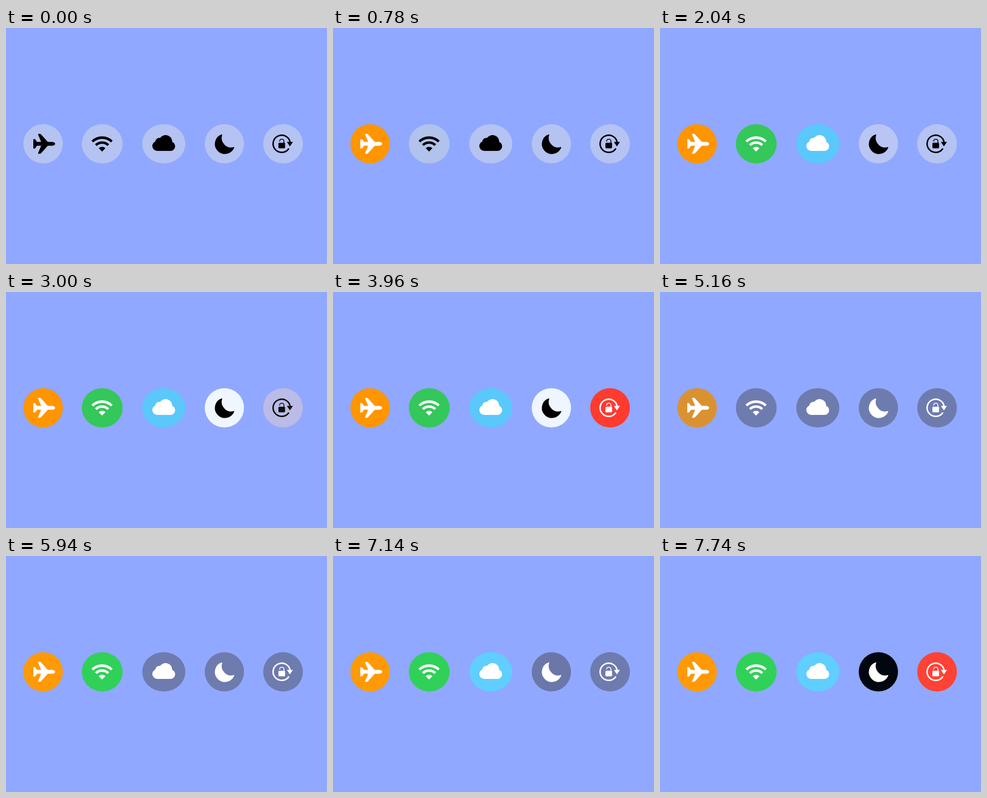
An HTML page for the animation above (8000 ms loop, 588 px wide and 432 px high).

```html
<!DOCTYPE html>
<html lang="en">
<head>
<meta charset="utf-8">
<title>Control toggles</title>
<style>
  html, body { margin: 0; width: 100%; height: 100%; overflow: hidden; background: #90a8ff; }
  svg { display: block; width: 588px; height: 432px; }
  .icon { fill: currentColor; stroke: none; }
  .line { fill: none; stroke: currentColor; }
</style>
</head>
<body>
<svg viewBox="0 0 588 432">
  <g class="tile">
    <ellipse cx="68" cy="212" rx="36.2" ry="36"/>
    <path class="icon" d="M90 212C90 209.6 87 208.4 84 208.4H76.6L64.4 195.1Q63.2 193.8 61.8 193.8H59.6Q58.4 193.8 58.8 195L64.4 208.4H56.8L53.6 204Q53 203.2 52 203.2H50.8Q50 203.2 50 204V220Q50 220.8 50.8 220.8H52Q53 220.8 53.6 220L56.8 215.6H64.4L58.8 229Q58.4 230.2 59.6 230.2H61.8Q63.2 230.2 64.4 228.9L76.6 215.6H84C87 215.6 90 214.4 90 212Z"/>
  </g>
  <g class="tile">
    <ellipse cx="176.3" cy="212" rx="37.4" ry="36"/>
    <g class="line" stroke-width="4.6">
      <path d="M158.2 207.9A25.3 25.3 0 0 1 193.8 207.9"/>
      <path d="M164.6 214.4A16.2 16.2 0 0 1 187.4 214.4"/>
    </g>
    <path class="icon" d="M176 226.2L169.9 220.1A8.7 8.7 0 0 1 182.1 220.1Z"/>
  </g>
  <g class="tile">
    <ellipse cx="289" cy="212" rx="39.5" ry="36"/>
    <g class="icon">
      <circle cx="292.3" cy="208" r="12"/>
      <circle cx="281.2" cy="208.8" r="7.8"/>
      <circle cx="277" cy="216" r="9"/>
      <circle cx="301.2" cy="216.4" r="8.6"/>
      <path d="M277 209H301V225H277Z"/>
    </g>
  </g>
  <g class="tile">
    <ellipse cx="400" cy="212" rx="36" ry="36"/>
    <path class="icon" style="stroke:currentColor;stroke-width:1.2;stroke-linejoin:round" d="M395.4 195.4A17.8 17.8 0 1 0 417.6 218.6A18.2 18.2 0 0 1 395.4 195.4Z"/>
  </g>
  <g class="tile">
    <ellipse cx="507.5" cy="212" rx="36.4" ry="36"/>
    <path class="line" stroke-width="2.7" d="M520.4 209A15.7 15.7 0 1 0 518.2 220.4"/>
    <path class="icon" d="M514.5 208.4H525.6L520 216.8Z"/>
    <rect class="icon" x="499" y="210" width="12.2" height="10.2" rx="1.6"/>
    <path class="line" stroke-width="1.6" d="M501.3 207.8V207A3.9 3.5 0 0 1 509.1 207V210.5"/>
  </g>
</svg>
<script>
const LOOP = 8000, TICK = 60;
const MODE = { at: 4380, steps: 9 };
const BLACK = [0, 0, 0], WHITE = [255, 255, 255];
const OFF_LIGHT = [181, 195, 242], OFF_DARK = [110, 123, 174];

// Each toggle: start, number of ticks, disc colour; first in light mode, then dark.
const toggles = [
  { light: [180, 6, [255, 149, 0]], dark: [5040, 5, [255, 154, 6]] },
  { light: [780, 5, [52, 199, 89]], dark: [5760, 4, [48, 209, 88]] },
  { light: [1320, 6, [90, 200, 250]], dark: [6480, 4, [96, 206, 255]] },
  { light: [2040, 4, [240, 246, 255]], dark: [7140, 5, [2, 6, 15]], icon: BLACK },
  { light: [3000, 4, [255, 59, 48]], dark: [7440, 6, [255, 66, 54]] }
];
const tiles = [...document.querySelectorAll('.tile')];

const ease = k => k < 0.5 ? 4 * k ** 3 : 1 - 4 * (1 - k) ** 3;
const easeOut = k => Math.sin(k * Math.PI / 2);
const mix = (a, b, p) => a.map((v, i) => v + (b[i] - v) * p);
const rgb = c => `rgb(${c.map(Math.round).join(',')})`;
const progress = (t, at, steps) =>
  Math.min(1, Math.max(0, (t - at + TICK) / (steps * TICK)));

function draw(now) {
  const t = Math.floor((now % LOOP) / TICK) * TICK;
  const mode = easeOut(t < MODE.at ? 0 : progress(t, MODE.at, MODE.steps));
  toggles.forEach(({ light, dark, icon = WHITE }, i) => {
    const on = ease(progress(t, light[0], light[1]));
    const again = ease(progress(t, dark[0], dark[1]));
    const disc = mix(mix(OFF_LIGHT, light[2], on), OFF_DARK, mode);
    const sign = mix(mix(BLACK, icon, on), WHITE, mode * mode);
    tiles[i].setAttribute('fill', rgb(mix(disc, dark[2], again)));
    tiles[i].style.color = rgb(sign);
  });
}

const start = performance.now();
function frame() {
  draw(performance.now() - start);
  requestAnimationFrame(frame);
}
frame();
</script>
</body>
</html>
```
